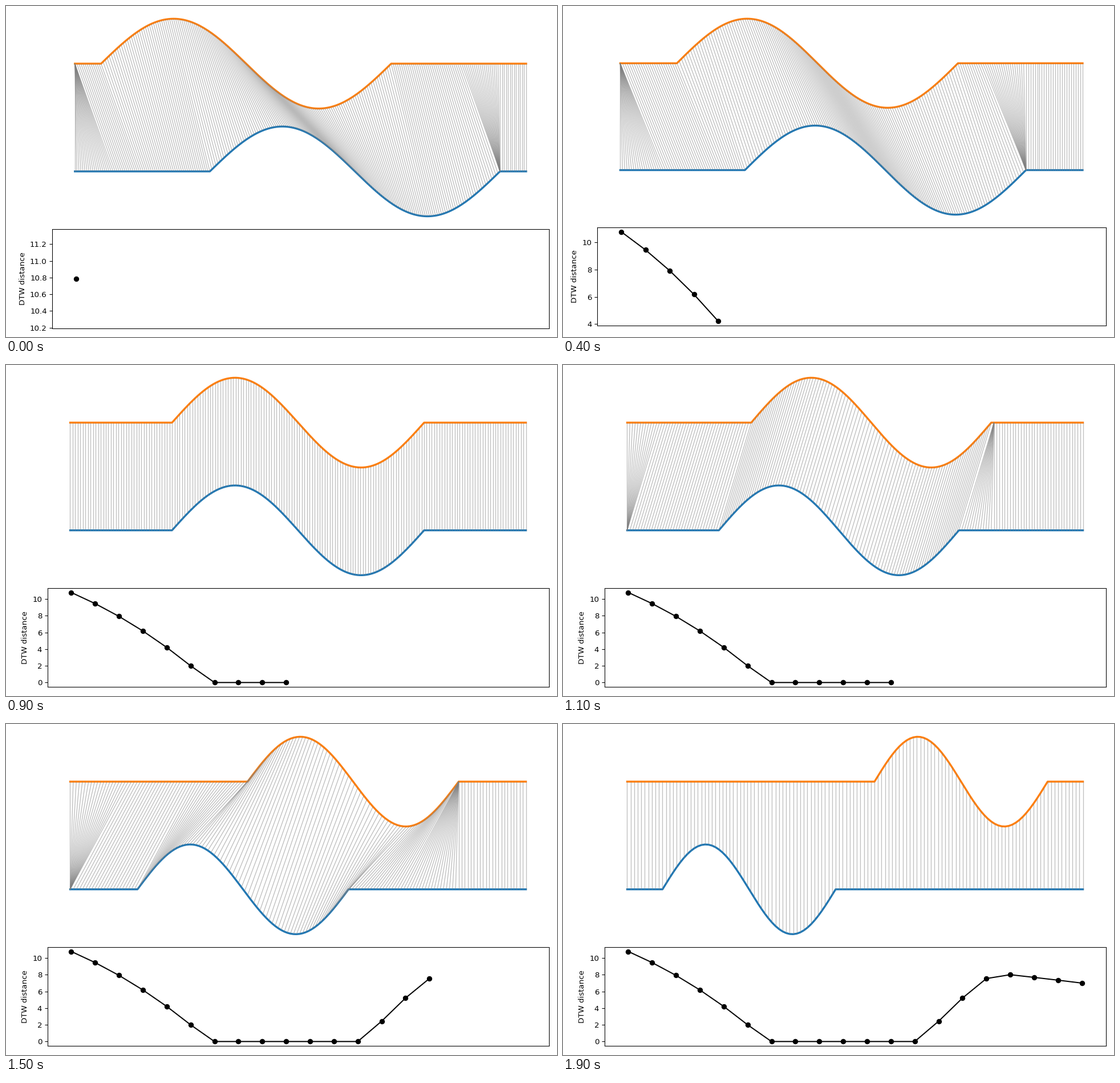
Recreate the animation shown at these times as a matplotlib script. Size 966 px wide and 580 px high, loop 2000 ms.

```python
import math

import numpy as np
import matplotlib.pyplot as plt
from matplotlib.animation import FuncAnimation
from matplotlib.collections import LineCollection

FRAMES = 20
RADIUS = 19      # half width of the warping band
PAD = 80         # flat samples around each wave
LIFT = 2.4       # vertical offset of the upper series


def make_pair(step):
    """Two copies of one sine period, sliding past each other."""
    wave = np.sin(np.linspace(0, 2 * np.pi, 145 - 5 * step))
    lead = 13 + 3 * step
    upper = np.pad(wave, (lead, PAD - lead))
    lower = np.pad(wave, (PAD - lead, lead))
    return upper, lower


def dtw(a, b):
    """Band-limited dynamic time warping: distance and matched index pairs."""
    a, b = a.tolist(), b.tolist()
    n = len(a)
    acc = [[math.inf] * (n + 1) for _ in range(n + 1)]
    acc[0][0] = 0.0
    for i in range(1, n + 1):
        row, prev = acc[i], acc[i - 1]
        for j in range(max(1, i - RADIUS), min(n, i + RADIUS) + 1):
            cost = (a[i - 1] - b[j - 1]) ** 2
            row[j] = cost + min(prev[j - 1], prev[j], row[j - 1])

    i = j = n
    path = [(i - 1, j - 1)]
    while i > 1 or j > 1:
        # the diagonal step wins ties
        moves = [(i - 1, j - 1), (i - 1, j), (i, j - 1)]
        i, j = min(moves, key=lambda m: acc[m[0]][m[1]])
        path.append((i - 1, j - 1))
    return math.sqrt(acc[n][n]), path[::-1]


pairs = [make_pair(step) for step in range(FRAMES)]
matches = [dtw(*pair) for pair in pairs]
distances = [dist for dist, _ in matches]

fig = plt.figure(figsize=(10, 6.0042), dpi=96.6)


def draw_series(ax, step):
    upper, lower = pairs[step]
    links = [[(i, upper[i] + LIFT), (j, lower[j])] for i, j in matches[step][1]]
    ax.plot(lower, color="tab:blue", lw=2.5)
    ax.plot(upper + LIFT, color="tab:orange", lw=2.5)
    ax.add_collection(LineCollection(links, colors="gray", alpha=0.5, linewidths=1))
    ax.set_ylim(-1.1, 3.5)
    ax.axis("off")


def draw_distance(ax, step):
    ax.plot(distances[:step + 1], "ko-")
    ax.set_xlim(-1, FRAMES)
    ax.set_xticks([])
    ax.set_ylabel("DTW distance", labelpad=4.4)


def draw(step):
    fig.clear()
    fig.subplots_adjust(left=0.125, right=0.9, bottom=0.11, top=0.88, hspace=0)
    draw_series(fig.add_subplot(3, 1, (1, 2)), step)
    draw_distance(fig.add_subplot(3, 1, 3), step)
    fig.tight_layout()
    return []


anim = FuncAnimation(fig, draw, frames=FRAMES, init_func=lambda: [],
                     interval=100, repeat=True, repeat_delay=0)
plt.show()
```
